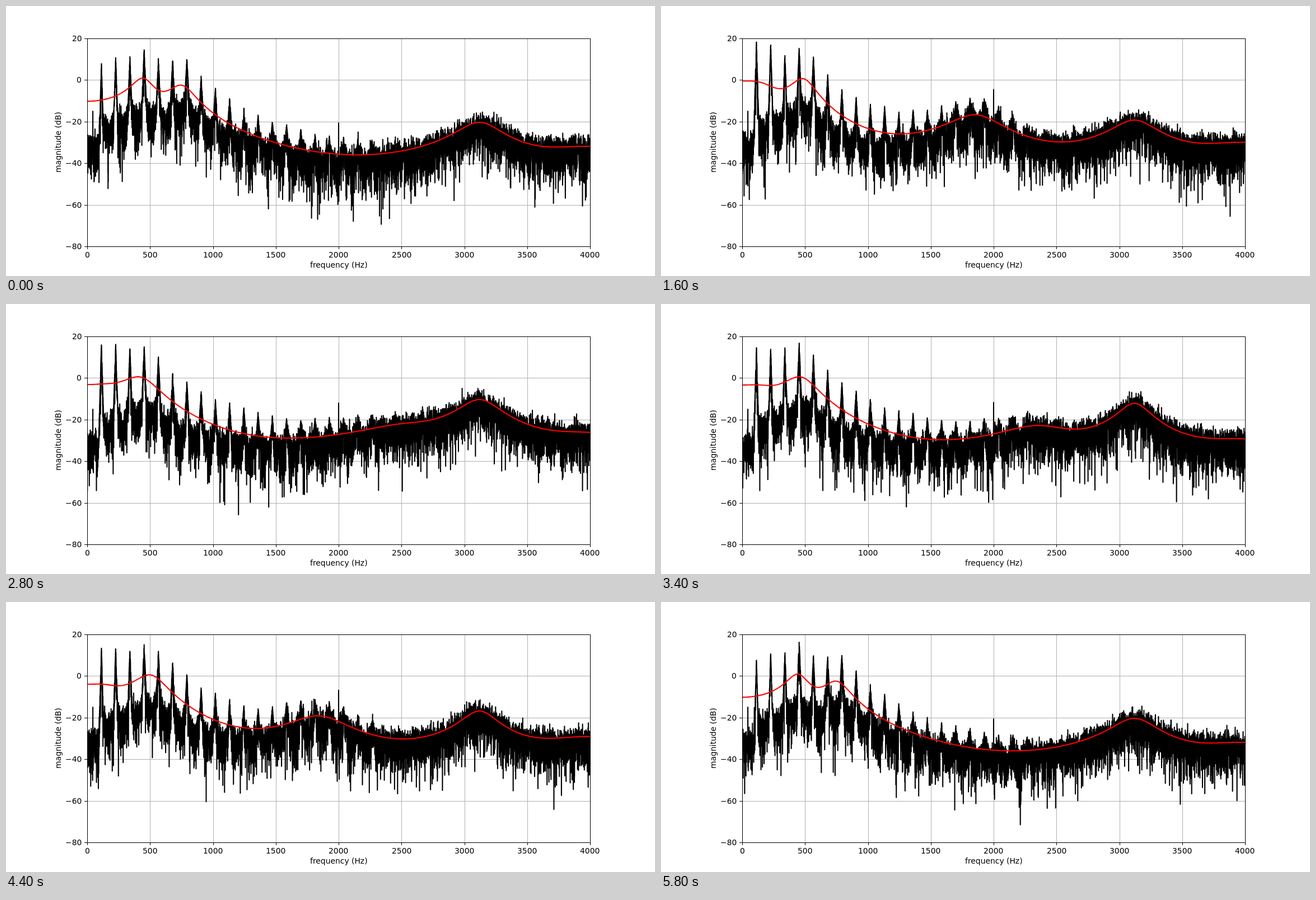
An HTML page with a canvas for the animation above (6 s loop, 1159 px wide and 483 px high).

```html
<!DOCTYPE html>
<html lang="en">
<head>
<meta charset="utf-8">
<title>Speech spectrum and formant envelope</title>
<style>
html, body { margin: 0; width: 100%; height: 100%; overflow: hidden; background: #fff; }
canvas { display: block; }
</style>
</head>
<body>
<canvas id="plot" width="1159" height="483"></canvas>
<script>
const ctx = document.getElementById('plot').getContext('2d');
const LEFT = 145, TOP = 58, WIDTH = 898, HEIGHT = 372;
const RIGHT = LEFT + WIDTH, BOTTOM = TOP + HEIGHT;
const STEP_MS = 200, STEPS = 30, PITCH = 113.3;
const px = hz => LEFT + hz / 4000 * WIDTH;
const py = db => TOP + (20 - db) / 100 * HEIGHT;
const snap = v => Math.round(v) + 0.5;

// Vowels on the loop; f = centre in Hz, b = bandwidth in Hz, a = level in dB.
const vowels = [
  { at: 0, low: -30, f1: 440, b1: 170, f2: 745, a2: -2.8, b2: 204, a3: -20.5, b3: 330, high: -33 },
  { at: 4, low: -25, f1: 490, b1: 293, f2: 1060, a2: -13.8, b2: 415, a3: -18.7, b3: 330, high: -27.2 },
  { at: 8, low: -1.4, f1: 480, b1: 187, f2: 1850, a2: -16.9, b2: 390, a3: -19.5, b3: 330, high: -31 },
  { at: 14, low: -8.8, f1: 405, b1: 296, f2: 2500, a2: -25.6, b2: 730, a3: -10.5, b3: 300, high: -28.3 },
  { at: 19, low: -5.6, f1: 485, b1: 237, f2: 2230, a2: -23, b2: 497, a3: -13.5, b3: 190, high: -32.6 },
  { at: 25, low: -8.2, f1: 503, b1: 258, f2: 1440, a2: -16, b2: 390, a3: -20.5, b3: 330, high: -27.3 }
];
vowels.push({ ...vowels[0], at: 29 });

function vowelAt(step) {
  const i = Math.max(1, vowels.findIndex(v => v.at >= step));
  const from = vowels[i - 1], to = vowels[i], t = (step - from.at) / (to.at - from.at);
  return Object.fromEntries(Object.keys(from).map(k => [k, from[k] + (to[k] - from[k]) * t]));
}

// Resonances blended between an amplitude sum and a power sum.
function envelopeAt(step) {
  const v = vowelAt(step), blend = 1.5;
  const part = (level, x) => (10 ** (level / 20) / (1 + x * x) ** 0.7) ** blend;
  const formant = (hz, f, level, b) => part(level, (f * f - hz * hz) / (f * b));
  return hz => 20 / blend * Math.log10(
    part(v.low, (hz / 230) ** 2)
    + formant(hz, v.f1, 0.5, v.b1)
    + formant(hz, v.f2, v.a2, v.b2)
    + formant(hz, 3120, v.a3, v.b3)
    + formant(hz, 4000, v.high, 800));
}

function randomFrom(seed) {
  return () => {
    seed = seed + 0x6D2B79F5 | 0;
    let t = Math.imul(seed ^ seed >>> 15, 1 | seed);
    t = t + Math.imul(t ^ t >>> 7, 61 | t) ^ t;
    return ((t ^ t >>> 14) >>> 0) / 4294967296;
  };
}

// Rayleigh noise under the envelope, pitch harmonics and two thin tones.
function spectrumAt(step, envelope) {
  const random = randomFrom(step * 7919 + 17);
  const peaks = Array.from({ length: 21 }, (_, k) =>
    envelope(k * PITCH) + (k < 3 ? 18.5 : 17 - 0.55 * k) + random() * 2 - 1);
  return hz => {
    if (hz === 45) return -15;
    if (hz === 2000) return envelope(hz) + 15;
    const noise = 10 * Math.log10(4e-4 - Math.log(1 - random()));
    const drop = 1.5 + 12 / (1 + (hz / 950) ** 4);
    let floor = hz < 95 ? -31.5 : Math.min(hz / 40 - 26, envelope(hz) - drop);
    if (hz > 95 && hz < 2300) floor += 2.5 * Math.cos(2 * Math.PI * hz / PITCH);
    const k = Math.round(hz / PITCH);
    if (k < 1 || k > 20) return floor + noise;
    const off = Math.abs(hz - k * PITCH);
    const lobe = peaks[k] - 20 * off / (8 + 1.5 * k);
    return Math.max(floor + noise, off < 0.3 ? lobe : lobe + Math.min(noise, 1));
  };
}

function curve(f, stepHz, color) {
  ctx.beginPath();
  for (let hz = 0; hz <= 4000; hz += stepHz) ctx.lineTo(px(hz), py(f(hz)));
  ctx.strokeStyle = color;
  ctx.lineWidth = 2.08;
  ctx.lineJoin = 'round';
  ctx.stroke();
}

function line(x1, y1, x2, y2, color) {
  ctx.beginPath();
  ctx.moveTo(x1, y1);
  ctx.lineTo(x2, y2);
  ctx.strokeStyle = color;
  ctx.lineWidth = 1;
  ctx.stroke();
}

// Text on whole pixels; anchor 0.5 centres it, 1 ends it at x.
function label(text, x, y, anchor = 0.5) {
  ctx.fillText(text, Math.round(x - ctx.measureText(text).width * anchor), Math.round(y));
}

function drawAxes() {
  ctx.fillStyle = '#000';
  ctx.font = '13.89px "DejaVu Sans", sans-serif';
  for (let hz = 0; hz <= 4000; hz += 500) {
    const x = snap(px(hz));
    line(x, TOP, x, BOTTOM, '#b0b0b0');
    line(x, BOTTOM, x, BOTTOM + 5, '#000');
    label(hz, px(hz), 450);
  }
  for (let db = -80; db <= 20; db += 20) {
    const y = snap(py(db));
    line(LEFT, y, RIGHT, y, '#b0b0b0');
    line(LEFT - 5, y, LEFT, y, '#000');
    label(String(db).replace('-', '\u2212'), 135.2, py(db) + 5, 1);
  }
  label('frequency (Hz)', 594, 468);
  ctx.save();
  ctx.translate(98, 244);
  ctx.rotate(-Math.PI / 2);
  label('magnitude (dB)', 0, 0);
  ctx.restore();
}

function draw(step) {
  ctx.fillStyle = '#fff';
  ctx.fillRect(0, 0, 1159, 483);
  drawAxes();

  const envelope = envelopeAt(step);
  ctx.save();
  ctx.beginPath();
  ctx.rect(LEFT, TOP, WIDTH, HEIGHT);
  ctx.clip();
  curve(spectrumAt(step, envelope), 0.5, '#000');
  curve(envelope, 8, '#f00');
  ctx.restore();

  ctx.strokeStyle = '#000';
  ctx.lineWidth = 1;
  ctx.lineJoin = 'miter';
  ctx.strokeRect(LEFT + 0.5, TOP + 0.5, WIDTH, HEIGHT);
}

let shown = -1;
function tick() {
  const step = Math.floor(performance.now() / STEP_MS) % STEPS;
  if (step !== shown) draw(shown = step);
  requestAnimationFrame(tick);
}
tick();
</script>
</body>
</html>
```
